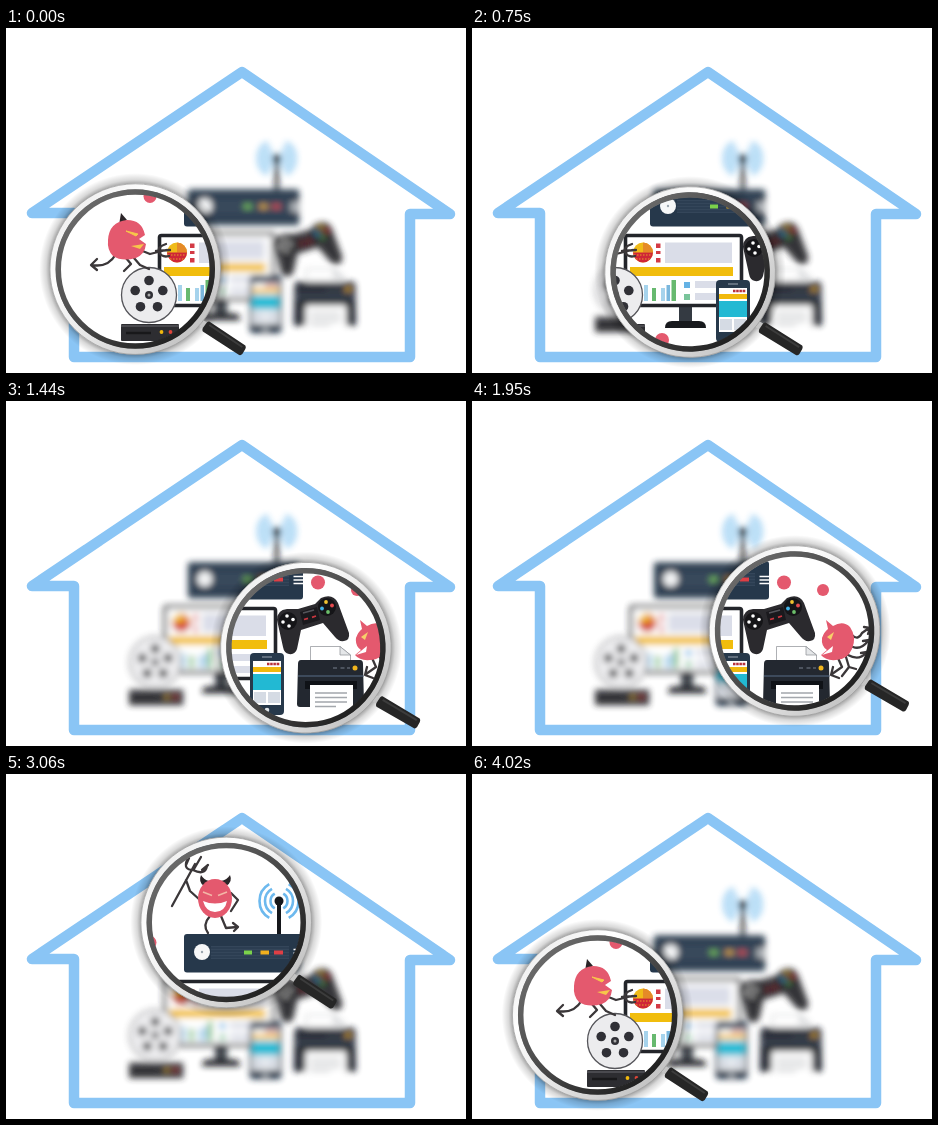
Recreate the animation shown at these times as an HTML page. Size 460 px wide and 345 px high, loop 4.05 s.

```html
<!DOCTYPE html>
<html lang="en">
<head>
<meta charset="utf-8">
<title>Home network check</title>
<style>
html, body { margin: 0; width: 100%; height: 100%; overflow: hidden; background: #fff; }
svg { display: block; width: 460px; height: 345px; }
.line { fill: none; stroke: #3b3739; stroke-width: 2.3; stroke-linecap: round; stroke-linejoin: round; }
.germ { fill: #e4596e; }
</style>
</head>
<body>
<svg viewBox="0 0 460 345">
  <defs>
    <filter id="soft" x="-10%" y="-10%" width="120%" height="120%"><feGaussianBlur stdDeviation="3"/></filter>
    <filter id="edge"><feGaussianBlur stdDeviation=".5"/></filter>
    <clipPath id="glass"><circle id="hole" r="75"/></clipPath>
    <radialGradient id="shade" gradientUnits="userSpaceOnUse" cx="0" cy="0" r="96">
      <stop offset=".86" stop-color="#000" stop-opacity=".48"/>
      <stop offset=".93" stop-color="#000" stop-opacity=".15"/>
      <stop offset="1" stop-color="#000" stop-opacity="0"/>
    </radialGradient>
    <linearGradient id="silver" x1="0" y1="0" x2="1" y2="1">
      <stop offset="0" stop-color="#e4e4e4"/><stop offset=".3" stop-color="#fff"/>
      <stop offset=".6" stop-color="#e2e2e2"/><stop offset="1" stop-color="#b5b5b5"/>
    </linearGradient>
    <linearGradient id="steel" x1="0" y1="0" x2="1" y2="1">
      <stop offset=".1" stop-color="#6c6c6c"/><stop offset=".5" stop-color="#484848"/><stop offset=".9" stop-color="#1c1c1c"/>
    </linearGradient>

    <g id="gear">
      <!-- router -->
      <g id="waves" fill="none" stroke="#6db9ee" stroke-width="2.6"></g>
      <path d="M273 128V161" stroke="#15171b" stroke-width="4"/>
      <circle cx="273" cy="127" r="4.5" fill="#15171b"/>
      <rect x="178" y="160" width="119" height="38.500" rx="3" fill="#26384b"/>
      <rect x="205" y="172" width="78" height="13" fill="#34465a"/>
      <path d="M205 174H283M205 177H283M205 180H283M205 183H283" stroke="#25364a"/>
      <circle cx="196" cy="178" r="8" fill="#f6f7f8"/><circle cx="196" cy="178" r="1.200" fill="#9aa5af"/>
      <rect x="238" y="176.500" width="8" height="4" fill="#7bd24b"/>
      <rect x="254.500" y="176.500" width="8.500" height="4" fill="#f2b01e"/>
      <rect x="268" y="176.500" width="9" height="4" fill="#df3f45"/>
      <path d="M287.500 175.500H297M287.500 179H297M287.500 182.500H297" stroke="#fff" stroke-width="1.500"/>

      <!-- monitor -->
      <path d="M207 278H220V294H207Z" fill="#343a42"/>
      <path d="M193 300Q193 293 200 293H227Q234 293 234 300Z" fill="#17191d"/>
      <rect x="153.500" y="207.500" width="116" height="70" rx="2" fill="#fff" stroke="#23252a" stroke-width="3.600"/>
      <circle cx="171" cy="224.500" r="10" fill="#f0bb18"/>
      <path d="M171 224.500V214.500A10 10 0 0 1 181 224.500Z" fill="#e58a27"/>
      <path d="M161 224.500H181A10 10 0 0 1 161 224.500Z" fill="#cf2637"/>
      <path d="M162 227H180M164 231H178" stroke="#e8a028" stroke-width="1.200" stroke-dasharray="1.500 1.500"/>
      <path d="M184 215.500H188.500V220H184ZM184 223H188.500V226H184ZM184 230H188.500V234.500H184Z" fill="#d33a45"/>
      <rect x="193" y="214.500" width="67" height="20.500" fill="#dadde8"/>
      <rect x="158" y="239" width="103" height="9" fill="#f1bd0d"/>
      <path d="M172 257H176V273H172ZM189 260H193V273H189Z" fill="#a6d3ec"/>
      <path d="M180 260H184V273H180ZM199.500 252H204V273H199.500Z" fill="#67b96f"/>
      <path d="M194.500 257H198V273H194.500Z" fill="#7ab7dd"/>
      <path d="M212 254H218V260H212Z" fill="#65b2e4"/>
      <path d="M212 266H218V272H212Z" fill="#79c49a"/>
      <path d="M223 253H261V260H223ZM223 265H261V272H223Z" fill="#dadde8"/>

      <!-- recorder and reel -->
      <rect x="115" y="296" width="58" height="17" rx="1" fill="#2d2d31"/>
      <path d="M115 298H173" stroke="#4a4a4f" stroke-width="2"/>
      <path d="M120 305H145" stroke="#18181a" stroke-width="2.500"/>
      <circle cx="155.500" cy="304" r="1.900" fill="#f1b90d"/><circle cx="164.500" cy="304" r="1.900" fill="#df4439"/>
      <circle cx="143" cy="267" r="27.500" fill="#ececee" stroke="#55555a" stroke-width="1.300"/>
      <g id="reel" fill="#303036"><circle cx="143" cy="267" r="4"/></g>
      <circle cx="143" cy="267" r="1.500" fill="#aaa"/>

      <!-- phone -->
      <rect x="244" y="252" width="34" height="62" rx="4" fill="#27394b"/>
      <rect x="247" y="260" width="28" height="44" fill="#fff"/>
      <path d="M256 256H266" stroke="#75828f" stroke-width="1.500"/>
      <path d="M261 263H274" stroke="#b83039" stroke-width="2.500" stroke-dasharray="2.500 .7"/>
      <rect x="247" y="266" width="28" height="5" fill="#f1b90d"/>
      <rect x="247" y="273" width="28" height="16" fill="#22b9d3"/>
      <path d="M248 291H260V302H248ZM262 291H274V302H262Z" fill="#d5dbe4"/>
      <circle cx="261" cy="309" r="2.300" fill="#dfe4e8"/>

      <!-- gamepad -->
      <path d="M271 219Q271 209 281 208L292 208L309 203L315 197Q327 192 332 202L343 232Q344 239 338 240Q333 241 329 236L317 222L295 229L291 248Q289 254 283 253Q278 252 277 246Z" fill="#2b2a2e"/>
      <path d="M294 211L311 206L314 219L297 224Z" fill="#1a191d"/>
      <circle cx="282" cy="220" r="9" fill="#151518"/><circle cx="321" cy="206" r="9" fill="#151518"/>
      <g fill="#fff"><circle cx="281" cy="215" r="1.800"/><circle cx="277" cy="221" r="1.800"/><circle cx="287" cy="218.500" r="1.800"/><circle cx="283" cy="225" r="1.800"/></g>
      <circle cx="320" cy="201" r="1.900" fill="#f1c331"/><circle cx="316" cy="207.500" r="1.900" fill="#42b3e8"/>
      <circle cx="326" cy="204.500" r="1.900" fill="#e44a4f"/><circle cx="322" cy="211" r="1.900" fill="#6cc06b"/>
      <path d="M297 212L308 209" stroke="#55555b" stroke-width="1.500"/>
      <path d="M298 218.500L302 217.300M306 216.300L310 215" stroke="#c9363f" stroke-width="1.800"/>

      <!-- printer -->
      <path d="M304.500 262V245.500H334L344.500 254V262Z" fill="#fff" stroke="#8b8f94" stroke-width=".7"/>
      <path d="M334 245.500V254H344.500Z" fill="#e5e7e9" stroke="#8b8f94" stroke-width=".7"/>
      <path d="M295 259H354Q357 259 357 263L358 303Q358 306 355 306H294Q291 306 291 303L292 263Q292 259 295 259Z" fill="#232830"/>
      <path d="M292 275H357.500" stroke="#46566a" stroke-width="1.500"/>
      <path d="M327 267H331M334.500 267H338.500M341 267H344" stroke="#59626e" stroke-width="1.500"/>
      <circle cx="349" cy="267" r="2.500" fill="#f1b51d"/>
      <path d="M299 280H351V288H299Z" fill="#0f1217"/>
      <rect x="304" y="284" width="43" height="30" fill="#fff"/>
      <path d="M309 292H341M309 296.500H341M309 301H341M309 305.500H330" stroke="#a3a7ac" stroke-width="1.300"/>
    </g>

    <g id="pests">
      <g id="germs" class="germ"></g>
      <!-- walking imp -->
      <path class="line" d="M110 226Q102 240 86 237M91 231L85 237L91 242M120 230L125 236L118 243M128 230L134 237L143 241M134 222L144 226L160 222M160 216Q151 219 153 224Q156 230 163 228M150 223L164 222"/>
      <path d="M113 197L115 185L121 192Z" fill="#2b2528"/>
      <path class="germ" d="M102 212Q103 194 121 192Q136 192 139 207L133 211L140 216Q139 226 130 230Q116 234 107 228Q101 222 102 212Z"/>
      <path d="M120 203L132 206L130 208Z" fill="#f7c64a" stroke="#f7c64a"/>
      <path d="M125 218L138 216L134 221Z" fill="#f7c64a"/>
      <!-- climbing imp -->
      <path class="line" d="M380 234Q386 240 390 232L397 227M392 226L398 227L396 233M381 246Q389 249 396 240M391 240L397 239L397 246M376 254Q387 260 394 252M389 252L395 251L395 258M366 257L370 266L360 273M361 266L359 274L367 277M374 256L377 266L370 275M377 266L384 268"/>
      <path class="germ" d="M354 219L361 225Q371 219 378 226Q385 236 380 248Q375 259 364 259Q354 260 349 254L355 249Q349 245 350 237Q352 231 356 228Z"/>
      <path d="M355 236L362 231L359 239Z" fill="#f7d06a"/>
      <path d="M350 254L361 245L360 251Z" fill="#fff"/>
      <!-- laughing imp -->
      <path class="line" d="M166 132L189 90M181 86Q177 96 187 96Q199 102 201 92M183 84L180 91M195 83L188 95M202 91L196 96M194 126L184 117L180 106M225 119L232 126L225 137M204 142Q196 151 202 159M215 142L220 154L231 153M227 149L232 153L228 157"/>
      <path d="M198 112Q192 108 195 101Q198 106 203 107ZM220 112Q227 108 224 101Q221 106 215 107Z" fill="#2b2528"/>
      <ellipse class="germ" cx="209" cy="124.500" rx="17" ry="19.500"/>
      <path d="M197 118L206 121.500M221 118L212 121.500" stroke="#f3b7a6" stroke-width="1.500"/>
      <path d="M197 127Q209 132 221 127Q219 138 209 138Q200 138 197 127Z" fill="#fff"/>
    </g>
  </defs>

  <rect width="460" height="345" fill="#fff"/>
  <path d="M236 44L26 185H68V329H404V186H444Z" fill="#fff" stroke="#8ac5f5" stroke-width="10.500" stroke-linejoin="round" filter="url(#edge)"/>
  <g filter="url(#soft)" opacity=".95">
    <use href="#gear" transform="translate(238 179) scale(.935) translate(-238 -179)"/>
  </g>

  <g id="frame">
    <circle r="96" fill="url(#shade)"/>
    <path d="M60 46L74 55L70 61L56 52Z" fill="#c4c4c4"/>
    <path d="M74 52.500L110 76.500Q111 78 110 80L107 85Q105 87 103 85.500L67.500 62.500Q66.500 61 67.500 59L71.500 53.500Q73 52 74 52.500Z" fill="#262626"/>
    <path d="M74 56L107 78" stroke="#3c3c3c" stroke-width="2"/>
    <circle r="77" fill="#fff"/>
  </g>
  <g clip-path="url(#glass)">
    <use href="#gear"/>
    <use href="#pests"/>
  </g>
  <g id="rim" fill="none">
    <circle r="82.500" stroke="url(#silver)" stroke-width="6"/>
    <circle r="85.300" stroke="#999" stroke-width=".7"/>
    <circle r="77" stroke="url(#steel)" stroke-width="5.500"/>
  </g>
</svg>
<script>
const $ = id => document.getElementById(id);
const add = (parent, tag, attrs) => {
  const el = document.createElementNS("http://www.w3.org/2000/svg", tag);
  for (const key in attrs) el.setAttribute(key, attrs[key]);
  parent.append(el);
};

for (const r of [8.5, 14, 19.5]) {
  const x = r * 0.5, y = r * 0.866;
  for (const s of [-1, 1])
    add($("waves"), "path", { d: `M${273 + s * x} ${127 - y}A${r} ${r} 0 0 ${s > 0 ? 1 : 0} ${273 + s * x} ${127 + y}` });
}
for (let i = 0; i < 5; i++) {
  const a = (i * 72 - 90) * Math.PI / 180;
  add($("reel"), "circle", { cx: 143 + 14.5 * Math.cos(a), cy: 267 + 14.5 * Math.sin(a), r: 4.8 });
}
for (const [cx, cy, r] of [[312, 181.5, 7], [351, 189, 6], [308, 130, 4], [144, 168.5, 6.5], [190, 312, 7]])
  add($("germs"), "circle", { cx, cy, r });

// Lens path: step, x, y, tilt
const STEP = 30, STEPS = 135;
const path = [[0, 125.7, 241, 0], [60, 339, 248, -3.6], [98, 235, 134, 0], [135, 125.7, 241, 0]];

function lensAt(step) {
  const i = path.findIndex(p => p[0] > step);
  const a = path[i - 1], b = path[i];
  const k = (step - a[0]) / (b[0] - a[0]);
  return a.map((v, j) => v + (b[j] - v) * k);
}

function draw(ms) {
  const step = (Math.floor(ms / STEP) + 1) % STEPS;
  const [, x, y, tilt] = lensAt(step);
  $("hole").setAttribute("cx", x);
  $("hole").setAttribute("cy", y);
  for (const id of ["frame", "rim"])
    $(id).setAttribute("transform", `translate(${x} ${y}) rotate(${tilt})`);
}

const start = performance.now();
function tick() {
  draw(performance.now() - start);
  requestAnimationFrame(tick);
}
draw(0);
requestAnimationFrame(tick);
</script>
</body>
</html>
```
